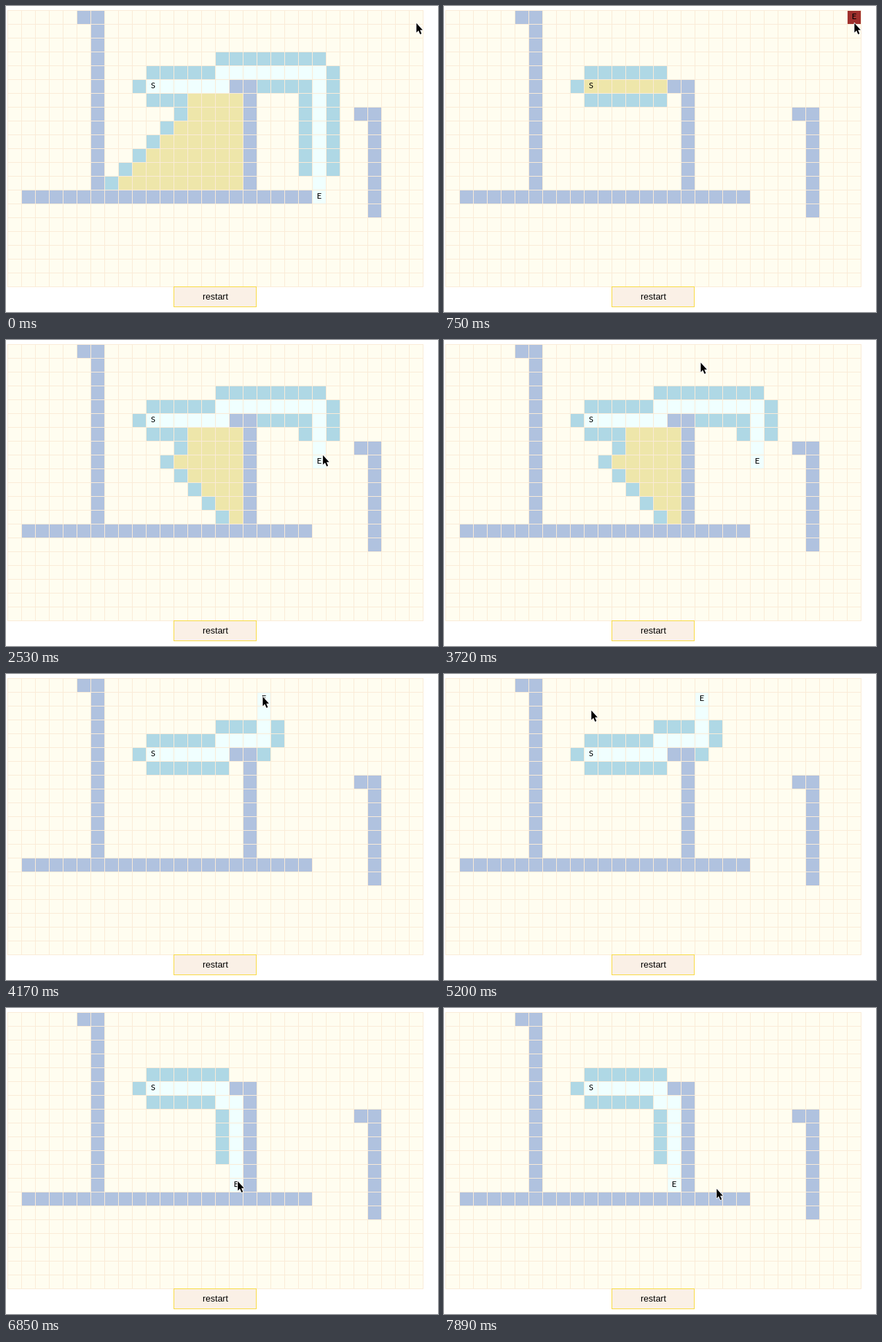
Write an HTML page that moves like this. It is 624 by 443 pixels and loops after 8 s.

```html
<!DOCTYPE html>
<html lang="en">
<head>
<meta charset="utf-8">
<title>Path finder</title>
<style>
  html, body { margin: 0; width: 100%; height: 100%; overflow: hidden; background: #fff; }
  svg { display: block; }
  text { text-anchor: middle; fill: #000; }
  .mark { font: 12px Lato, sans-serif; }
  .label { font: 13px "Liberation Sans", Arial, sans-serif; }
</style>
</head>
<body>
<svg width="624" height="443" viewBox="0 0 624 443">
  <rect x="2" y="6" width="601" height="401" fill="#fffdf0"/>
  <g id="cells" shape-rendering="crispEdges"></g>
  <path id="grid" fill="none" stroke="#faebd7" shape-rendering="crispEdges"/>
  <text class="mark" id="start">S</text>
  <text class="mark" id="end">E</text>
  <rect x="242.5" y="406.5" width="119" height="29" fill="#faf0e6" stroke="#f8da42"/>
  <text class="label" x="302.4" y="425">restart</text>
  <path id="cursor" d="M.8 .8V14.4L3.8 11.6L6.2 17L8.2 16.1L6 10.8H9.8Z" fill="#000"
    stroke="#fff" stroke-width="1.6" paint-order="stroke" stroke-linejoin="round"/>
</svg>
<script>
const LOOP = 8000, COLS = 30, ROWS = 20, CELL = 20, STEP = 147;
const COLOR = { wall: '#b0c2df', open: '#afd8e5', closed: '#eee6aa', path: '#f0ffff', hot: '#9f302d' };
const START = [10, 5];
const DIRS = [[1, 0], [0, 1], [-1, 0], [0, -1]];
const $ = id => document.getElementById(id);

// Wall runs: column, row, columns, rows
const walls = [[5, 0, 2, 1], [6, 0, 1, 13], [1, 13, 21, 1], [16, 5, 2, 1],
  [17, 5, 1, 8], [25, 7, 2, 1], [26, 7, 1, 8]];

// Searches: time, goal, and how many cells are visited so far
const searches = [
  { at: 0, goal: [22, 13] },
  { at: 750, goal: [29, 0], limit: 6 },
  { at: 900, goal: [29, 0] },
  { at: 2390, goal: [22, 8], limit: 6 },
  { at: 2530, goal: [22, 8] },
  { at: 4170, goal: [18, 1] },
  { at: 5350, goal: [10, 2] },
  { at: 6850, goal: [16, 12] }
];

// Pointer legs: time, number of steps, where it stops
const legs = [
  { at: 0, n: 1, to: [592, 24] },
  { at: 1490, n: 4, to: [457, 166] },
  { at: 3130, n: 5, to: [370, 32] },
  { at: 4610, n: 3, to: [212, 52] },
  { at: 5650, n: 3, to: [341, 187] },
  { at: 6100, n: 3, to: [334, 250] },
  { at: 7290, n: 5, to: [393, 261] }
];

const isWall = (x, y) => walls.some(([c, r, w, h]) => x >= c && x < c + w && y >= r && y < r + h);
const isFree = (x, y) => x >= 0 && y >= 0 && x < COLS && y < ROWS && !isWall(x, y);

// Greedy best-first search by Manhattan distance; the oldest cell wins a tie
function search([gx, gy], limit = Infinity) {
  const node = (x, y, from) => ({ x, y, from, kind: 'open', h: Math.abs(x - gx) + Math.abs(y - gy) });
  const seen = [node(...START)];
  for (let visits = 0; visits < limit; visits++) {
    const open = seen.filter(n => n.kind === 'open');
    if (!open.length) break;
    const best = open.reduce((a, b) => b.h < a.h ? b : a);
    best.kind = 'closed';
    if (best.h === 1) {
      seen.push(node(gx, gy, best));
      for (let n = seen[seen.length - 1]; n; n = n.from) n.kind = 'path';
      return seen;
    }
    for (const [dx, dy] of DIRS) {
      const x = best.x + dx, y = best.y + dy;
      if (isFree(x, y) && !seen.some(n => n.x === x && n.y === y)) seen.push(node(x, y, best));
    }
  }
  return [...seen, { x: gx, y: gy, kind: 'hot' }];
}

const block = (kind, c, r, w = 1, h = 1) =>
  `<rect x="${2 + c * CELL}" y="${6 + r * CELL}" width="${w * CELL}" height="${h * CELL}" fill="${COLOR[kind]}"/>`;

function place(id, [c, r]) {
  $(id).setAttribute('x', c * CELL + 12.5);
  $(id).setAttribute('y', r * CELL + 19.4);
}

const lastIndex = (list, t) => list.filter(o => o.at <= t).length - 1;

function pointer(t) {
  const i = lastIndex(legs, t), { at, n, to } = legs[i];
  const from = (legs[i - 1] || legs[i]).to;
  const u = Math.min(1, (Math.floor((t - at) / STEP) + 1) / n);
  const ease = 1 - (1 - u) ** 2;
  return to.map((v, k) => Math.round(from[k] + (v - from[k]) * ease));
}

let grid = '';
for (let c = 0; c <= COLS; c++) grid += `M${2.5 + c * CELL} 6v401`;
for (let r = 0; r <= ROWS; r++) grid += `M2 ${6.5 + r * CELL}h601`;
$('grid').setAttribute('d', grid);
place('start', START);

const wallArt = walls.map(w => block('wall', ...w)).join('');
for (const s of searches) {
  s.art = wallArt + search(s.goal, s.limit).map(n => block(n.kind, n.x, n.y)).join('');
}

let shown;
function draw(t) {
  const s = searches[lastIndex(searches, t)];
  if (s !== shown) {
    shown = s;
    $('cells').innerHTML = s.art;
    place('end', s.goal);
  }
  $('cursor').setAttribute('transform', `translate(${pointer(t)})`);
}

const began = performance.now();
function tick() {
  draw((performance.now() - began) % LOOP);
  requestAnimationFrame(tick);
}
tick();
</script>
</body>
</html>
```
